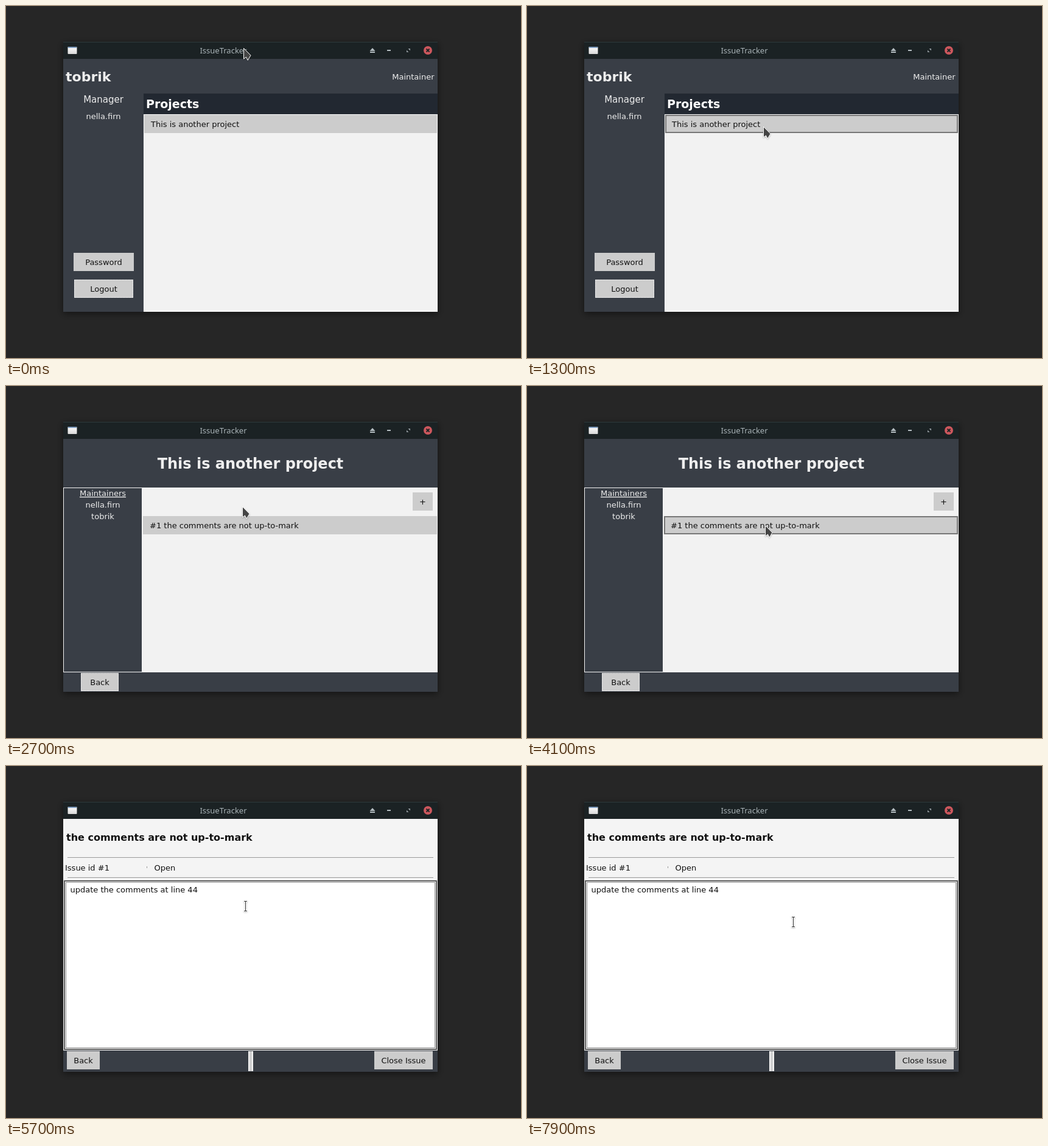
Animation, 846 px wide and 579 px high, one loop 8000 ms. Source, as an HTML page:

```html
<!DOCTYPE html>
<html lang="en">
<head>
<meta charset="utf-8">
<title>Issue tracker demo</title>
<style>
  html, body { margin: 0; width: 100%; height: 100%; overflow: hidden; background: #262626; }
  svg { display: block; width: 846px; height: 579px; }
  text { font: 13px "DejaVu Sans", sans-serif; fill: #111; white-space: pre; }
  .light { fill: #eee; }
  .bold { font-weight: bold; }
  .mid { text-anchor: middle; }
  .title { font: 13px "Noto Sans", sans-serif; fill: #a9b3b7; }
</style>
</head>
<body>
<svg id="stage" viewBox="0 0 846 579">
  <defs>
    <filter id="shadow" x="-10%" y="-10%" width="120%" height="120%">
      <feDropShadow dx="0" dy="3" stdDeviation="6" flood-color="#000" flood-opacity=".5"/>
    </filter>
    <filter id="soft" x="-50%" y="-50%" width="200%" height="200%">
      <feDropShadow dx="0" dy="1" stdDeviation="1" flood-color="#000" flood-opacity=".3"/>
    </filter>
    <linearGradient id="paper" x2="0" y2="1">
      <stop offset="0" stop-color="#fff"/><stop offset="1" stop-color="#d8d8d8"/>
    </linearGradient>
  </defs>
  <rect width="846" height="579" fill="#262626"/>
  <rect x="94" y="59" width="615" height="444" fill="#393e46" filter="url(#shadow)"/>
  <g id="bar">
    <rect x="94" y="59" width="615" height="28" fill="#1b2224"/>
    <rect x="94" y="59" width="615" height="1" fill="#2d3a3c"/>
    <rect x="101.5" y="67" width="15" height="12" rx="1" fill="url(#paper)"/>
    <rect x="102" y="67" width="14" height="2" fill="#7d9cc0"/>
    <text class="title mid" x="357" y="78">IssueTracker</text>
    <g fill="#b3bcc0">
      <path d="M597.5 74 L602 69 L606.5 74Z M598 75h8v2h-8Z M626 72h6v2h-6Z"/>
      <path d="M660.5 70h3.5v3.5Z M658 72.5v3.5h3.5Z" opacity=".8"/>
    </g>
    <circle cx="693" cy="73" r="7" fill="#cc575d"/>
    <path d="M690.5 70.5l5 5m0-5l-5 5" stroke="#1b2224" stroke-width="1.8"/>
  </g>
  <g id="home"></g>
  <g id="project"></g>
  <g id="issue"></g>
  <path id="arrow" d="M.5 .5V18L4.5 15L7.2 20.2L12 12.2Z" fill="#444" stroke="#fff" stroke-linejoin="round" filter="url(#soft)"/>
  <g id="beam" filter="url(#soft)">
    <path d="M-3 -8.5H3M-3 7.5H3M0 -8V7" fill="none" stroke="#fff" stroke-width="3" opacity=".8"/>
    <path d="M-2.5 -8.5H2.5M-2.5 7.5H2.5M0 -8V7" fill="none" stroke="#333"/>
  </g>
</svg>
<script>
const LOOP = 8000, STEP = 100;
const USER = 'tobrik', MANAGER = 'nella.firn';
const PANEL = '#393e46', PAGE = '#f2f2f2', BUTTON = '#ccc';
const $ = id => document.getElementById(id);

const box = (x, y, x2, y2, fill, extra = '') =>
  `<rect x="${x}" y="${y}" width="${x2 - x}" height="${y2 - y}" fill="${fill}" ${extra}/>`;
const frame = (x, y, x2, y2, color, w = 1, extra = '') =>
  box(x + w / 2, y + w / 2, x2 - w / 2, y2 - w / 2, 'none', `stroke="${color}" stroke-width="${w}" ${extra}`);
const label = (x, y, str, cls = '', size = 13, extra = '') =>
  `<text x="${x}" y="${y}" class="${cls}" style="font-size:${size}px" ${extra}>${str}</text>`;
const dots = (x, y, x2, y2, id) =>
  frame(x, y, x2, y2, '#f8f8f8', 1, `stroke-dasharray="1.5 1" id="${id}"`);
const button = (x, y, x2, y2, str) =>
  box(x, y, x2, y2, BUTTON) + label((x + x2) / 2, y + 20, str, 'mid');

// A list entry with hover outline and focus dots
const row = (id, x, y, textX, str) => `<g id="${id}">
  ${box(x, y, 708, y + 30, BUTTON, `id="${id}Fill"`)}
  ${frame(x, y, 708, y + 30, '#777', 2, `id="${id}Hover"`)}
  ${dots(x, y, 708, y + 30, id + 'Focus')}
  ${label(textX, y + 20, str)}</g>`;

$('home').innerHTML =
  box(94, 87, 709, 503, PANEL) +
  label(98, 124, USER, 'light bold', 22) +
  label(703.5, 121, 'Maintainer', 'light', 13, 'text-anchor="end"') +
  label(160, 159, 'Manager', 'light mid', 15) +
  label(160, 186, MANAGER, 'light mid') +
  box(226, 144, 709, 178, '#222831') +
  label(230, 168, 'Projects', 'bold', 19, 'fill="#fff" style="fill:#fff;font-size:19px"'.replace('fill="#fff" ', '').replace(/style=".*"/, '')) +
  box(226, 178, 709, 503, PAGE) +
  frame(226, 178, 709, 503, '#fbfbfb') +
  row('first', 227, 179, 238, 'This is another project') +
  button(111, 406, 210, 436, 'Password') +
  button(112, 450, 209, 480, 'Logout') +
  dots(112, 450, 209, 480, 'logoutFocus');
$('home').querySelector('.bold:not(.light)').style.fill = '#fff';

$('project').innerHTML =
  box(94, 87, 709, 503, PANEL) +
  label(401.5, 136, 'This is another project', 'light bold mid', 24) +
  box(223, 167, 709, 471, PAGE) +
  frame(94, 167, 224, 471, '#f4f4f4') +
  box(94, 167, 709, 168, '#f4f4f4') +
  label(159, 181, 'Maintainers', 'light mid', 13, 'text-decoration="underline"') +
  label(159, 200, MANAGER, 'light mid') +
  label(159, 219, USER, 'light mid') +
  button(668, 175, 701, 205, '+') +
  row('second', 225, 214, 236, '#1 the comments are not up-to-mark') +
  button(123, 472, 185, 502, 'Back') +
  dots(123, 472, 185, 502, 'backFocus');

$('issue').innerHTML =
  box(94, 87, 709, 468, '#f4f4f4') +
  label(99, 123, 'the comments are not up-to-mark', 'bold', 16) +
  box(101, 150, 702, 151, '#999') +
  box(101, 183, 702, 184, '#999') +
  label(97, 172, 'Issue id #1') +
  box(231, 165, 232, 168, '#999') +
  label(243.5, 172, 'Open') +
  box(95, 188, 708, 467, '#fff') +
  frame(95, 188, 708, 467, '#5c5c5c', 2) +
  frame(98, 191, 705, 464, '#8c8c8c') +
  label(105.5, 208, 'update the comments at line 44') +
  box(94, 468, 709, 503, PANEL) +
  button(100, 469, 154, 499, 'Back') +
  box(398, 469, 406, 502, '#f4f4f4') +
  box(400, 469, 404, 502, '#d0d0d0') +
  button(605, 469, 701, 499, 'Close Issue');

// Pointer moves: start time, number of steps, target
const arrowMoves = [[600, 8, 388, 198], [3800, 4, 391, 229], [5200, 1, 392, 230]];
const beamMoves = [[7700, 3, 437.5, 257]];

function pointer(t, x, y, moves) {
  for (const [start, n, tx, ty] of moves) {
    const k = Math.max(0, Math.min(n, Math.floor((t - start) / STEP) + 1)) / n;
    const e = k * k * (3 - 2 * k);
    x += (tx - x) * e;
    y += (ty - y) * e;
  }
  return [x, y];
}

const show = (id, on) => { $(id).style.display = on ? '' : 'none'; };
const place = (id, [x, y]) =>
  $(id).setAttribute('transform', `translate(${Math.floor(x * 2) / 2} ${Math.round(y)})`);

function setRow(id, cx, top, y, pressed) {
  const cy = top + 15;
  show(id + 'Hover', !pressed && y >= top && y < top + 30);
  show(id + 'Focus', pressed);
  $(id + 'Fill').setAttribute('fill', pressed ? '#999' : BUTTON);
  $(id).setAttribute('transform', pressed
    ? `translate(${cx} ${cy}) scale(.97) translate(${-cx} ${-cy})` : '');
}

function draw(t) {
  const tip = pointer(t, 390, 69, arrowMoves);
  const pressFirst = t >= 2400, pressSecond = t >= 5400;
  show('home', t < 2700);
  show('project', t >= 2700 && t < 5700);
  show('issue', t >= 5700);
  show('arrow', t < 5700);
  show('beam', t >= 5700);
  show('logoutFocus', !pressFirst);
  show('backFocus', !pressSecond);
  setRow('first', 467.5, 179, tip[1], pressFirst);
  setRow('second', 466.5, 214, tip[1], pressSecond);
  place('arrow', tip);
  place('beam', pointer(t, 393.5, 231, beamMoves));
}

const begin = performance.now();
function tick() {
  draw((performance.now() - begin) % LOOP);
  requestAnimationFrame(tick);
}
draw(0);
requestAnimationFrame(tick);
</script>
</body>
</html>
```
